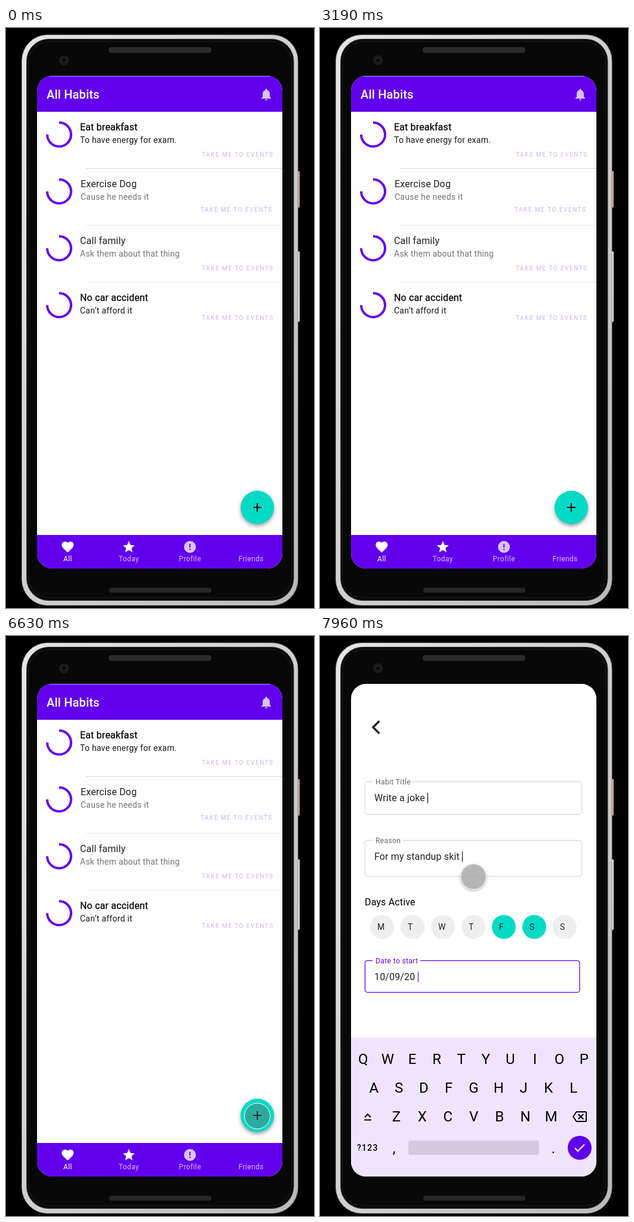
These frames come from a looping animation (516 by 969 pixels, 8000 ms). An HTML page:

```html
<!DOCTYPE html>
<html lang="en">
<head>
<meta charset="utf-8">
<title>Habit tracker</title>
<style>
  html, body { margin: 0; width: 100%; height: 100%; overflow: hidden; background: #000; }
  svg { display: block; width: 516px; height: 969px; font-family: Roboto, sans-serif; }
  .h6 { font-size: 20px; font-weight: 500; letter-spacing: .15px; }
  .title { font-size: 16px; letter-spacing: .15px; }
  .body { font-size: 14px; letter-spacing: .25px; }
  .caption { font-size: 12px; letter-spacing: .4px; }
  .overline { font-size: 10px; letter-spacing: 1.5px; fill: #cdb5f8; }
  .key { font-size: 24px; text-anchor: middle; }
  .mid { text-anchor: middle; }
  .strong { stroke: #000; stroke-width: .25px; }
  .pointer { fill: rgba(178,178,178,.765); stroke: #fff; filter: drop-shadow(0 2px 2px rgba(0,0,0,.3)); }
  .pointer.pressed { fill: rgba(104,104,104,.42); filter: none; }
</style>
</head>
<body>
<svg viewBox="0 0 516 969">
  <defs>
    <linearGradient id="metal" x1="0" y1="0" x2="1" y2="1">
      <stop offset="0" stop-color="#e6e6e4"/>
      <stop offset=".5" stop-color="#d2d1d0"/>
      <stop offset="1" stop-color="#bcbbbb"/>
    </linearGradient>
    <clipPath id="screen"><rect x="52" y="80" width="411" height="823" rx="25"/></clipPath>
  </defs>

  <g id="phone">
    <rect x="487" y="239" width="5" height="61" rx="2" fill="#d0a592"/>
    <rect x="487" y="373" width="5" height="118" rx="2" fill="#dedddd"/>
    <rect x="26.5" y="11.5" width="462.5" height="953" rx="43" fill="url(#metal)" stroke="#8f8f8f"/>
    <rect x="34.5" y="18.5" width="447.5" height="938" rx="37" fill="#0a0a0a" stroke="#3c3c3c"/>
    <rect x="37.5" y="22.5" width="441" height="929" rx="35" fill="#080808" stroke="#1b1b1b"/>
    <rect x="172" y="32" width="172" height="9.5" rx="4.5" fill="#2d2a2a"/>
    <rect x="173" y="935" width="171" height="8.5" rx="4" fill="#272525"/>
    <circle cx="97" cy="54" r="8.5" fill="#191919"/>
    <circle cx="97" cy="54" r="4" fill="#0b0b0b" stroke="#2b2b2b"/>
  </g>

  <g clip-path="url(#screen)">
    <g id="list">
      <rect x="52" y="80" width="411" height="823" fill="#fefefe"/>
      <path d="M52 80h411v60H52z" fill="#6200ee"/>
      <path d="M70 80.5h375" stroke="#cfc6dc" stroke-width=".8"/>
      <text x="68" y="118" class="h6" fill="#fff">All Habits</text>
      <path transform="translate(424 99)" fill="#d8c2fb" d="M12 22c1.1 0 2-.9 2-2h-4c0 1.1.89 2 2 2zm6-6v-5c0-3.07-1.64-5.64-4.5-6.32V4c0-.83-.67-1.5-1.5-1.5s-1.5.67-1.5 1.5v.68C7.63 5.36 6 7.92 6 11v5l-2 2v1h16v-1l-2-2z"/>
      <g id="habits"></g>
      <g style="filter: drop-shadow(0 3px 3px rgba(0,0,0,.38))">
        <circle cx="421" cy="801" r="28" fill="#03dac5"/>
      </g>
      <path d="M414 801h14M421 794v14" stroke="#000" stroke-width="2"/>
      <path d="M52 847h411v56H52z" fill="#6200ee"/>
      <g id="tabs"></g>
    </g>

    <g id="form">
      <rect x="52" y="80" width="411" height="823" fill="#fff"/>
      <path d="M99.5 142L89 152.5l10.5 10.5" fill="none" stroke="#262626" stroke-width="3.6"/>
      <g id="fields"></g>
      <text x="75" y="450" class="title">Days Active</text>
      <g id="days"></g>
      <path d="M52 671h411v232H52z" fill="#eee5fd"/>
      <g id="keys"></g>
      <path d="M75 804l5-5 5 5M74 808.5h12" fill="none" stroke="#000" stroke-width="2"/>
      <path transform="translate(423 791)" d="M22 3H7c-.69 0-1.23.35-1.59.88L0 12l5.41 8.11c.36.53.9.89 1.59.89h15c1.1 0 2-.9 2-2V5c0-1.1-.9-2-2-2zm0 16H7.07L2.4 12l4.66-7H22v14zm-11.59-2L14 13.41 17.59 17 19 15.59 15.41 12 19 8.41 17.59 7 14 10.59 10.41 7 9 8.41 12.59 12 9 15.59z"/>
      <text x="62" y="860" font-size="14" font-weight="500" letter-spacing="1.25">?123</text>
      <text x="124" y="864" class="key">,</text>
      <text x="391" y="864" class="key">.</text>
      <rect x="148" y="843" width="219" height="24" rx="4" fill="#d2c9df"/>
      <circle cx="435" cy="855" r="20" fill="#6200ee"/>
      <path d="M427 855.5l5 5 11-11" fill="none" stroke="#fff" stroke-width="2"/>
    </g>
  </g>

  <circle id="pointer" class="pointer" r="21.5"/>
</svg>

<script>
const $ = id => document.getElementById(id);
const text = (x, y, cls, fill, str) =>
  `<text x="${x}" y="${y}" class="${cls}" fill="${fill}">${str}</text>`;

// title, reason, text x, link x, link baseline, emphasised
const habits = [
  ["Eat breakfast", "To have energy for exam.", 124, 328, 215, true],
  ["Exercise Dog", "Cause he needs it", 125, 326, 307, false],
  ["Call family", "Ask them about that thing", 124, 328, 405, false],
  ["No car accident", "Can’t afford it", 124, 328, 488, true]
];
$("habits").innerHTML = habits.map(([title, reason, x, linkX, linkY, strong], i) => {
  const y = 95 * i;
  const line = i < 3
    ? `<path d="M134 ${y + 234.5}h329" stroke="${i ? "#e9e9e9" : "#d4d4d4"}"/>` : "";
  return `<path d="M89 ${y + 158}a20 20 0 1 1 -20 20" fill="none" stroke="#6200ee" stroke-width="4"/>`
    + text(x, y + 171, strong ? "title strong" : "title", strong ? "#000" : "#222", title)
    + text(x, y + 192, "body", strong ? "#1a1a1a" : "#757575", reason)
    + text(linkX, linkY, "overline", "", "TAKE ME TO EVENTS") + line;
}).join("");

const tabs = [
  ["All", "#fff", "#fff", "M12 21.35l-1.45-1.32C5.4 15.36 2 12.28 2 8.5 2 5.42 4.42 3 7.5 3c1.74 0 3.41.81 4.5 2.09C13.09 3.81 14.76 3 16.5 3 19.58 3 22 5.42 22 8.5c0 3.78-3.4 6.86-8.55 11.54z"],
  ["Today", "#d3baf9", "#fff", "M12 17.27L18.18 21l-1.64-7.03L22 9.24l-7.19-.61L12 2 9.19 8.63 2 9.24l5.46 4.73L5.82 21z"],
  ["Profile", "#d3baf9", "#d8c2fb", "M12 2a10 10 0 1 0 0 20 10 10 0 1 0 0-20zm1 15h-2v-2h2zm0-4h-2V7h2z"],
  ["Friends", "#d3baf9", "none", ""]
];
$("tabs").innerHTML = tabs.map(([label, color, iconColor, icon], i) => {
  const x = 103.4 + 102.4 * i;
  return `<path transform="translate(${x - 12} 855)" fill="${iconColor}" fill-rule="evenodd" d="${icon}"/>`
    + text(x, 891, "caption mid", color, label);
}).join("");

// label, value, top, bottom, right, label gap start and end, caret x, outline, label colour, caret colour
const fields = [
  ["Habit Title", "Write a joke", 243.5, 298, 438.5, 89, 155, 180.5, "#dcdcdc", "#666", "#000"],
  ["Reason", "For my standup skit", 341.5, 401.5, 438.5, 89, 138, 238.5, "#dcdcdc", "#666", "#000"],
  ["Date to start", "10/09/20", 542.3, 595.3, 435, 88, 168, 164.5, "#6200ee", "#6200ee", "#6200ee"]
];
$("fields").innerHTML = fields.map(
  ([label, value, top, bottom, right, gapA, gapB, caret, outline, labelColor, caretColor]) =>
    `<path d="M${gapA} ${top}H79.5a4 4 0 0 0 -4 4V${bottom - 4}a4 4 0 0 0 4 4H${right - 4}
      a4 4 0 0 0 4 -4V${top + 4}a4 4 0 0 0 -4 -4H${gapB}" fill="none" stroke="${outline}" stroke-width="1.3"/>`
    + text(93, top + 4.5, "caption", labelColor, label)
    + text(91, top + 32.5, "title", "#222", value)
    + `<path d="M${caret} ${top + 18.5}v17.5" stroke="${caretColor}" stroke-width="1.1"/>`
).join("");

$("days").innerHTML = [..."MTWTFSS"].map((day, i) =>
  `<circle cx="${104 + 51 * i}" cy="486" r="20" fill="${i === 4 || i === 5 ? "#03dac5" : "#eee"}"/>`
  + text(96 + 51 * i, 491, "body", "#222", day)
).join("");

const keyRow = (letters, x, pitch, y) =>
  [...letters].map((c, i) => text(x + pitch * i, y, "key", "#000", c)).join("");
$("keys").innerHTML = keyRow("QWERTYUIOP", 72.3, 41.1, 715)
  + keyRow("ASDFGHJKL", 90.3, 41.8, 763)
  + keyRow("ZXCVBNM", 128, 43.2, 811);

// Pointer moves: start, duration, steps, path (none = hidden). The end is held until the next move.
const moves = [
  [0],
  [120, 1, 1, "M497 953"],
  [380, 1, 1, "M505 949"],
  [440],
  [1650, 1, 1, "M513 796"],
  [2110, 140, 2, "M514 792L520 792"],
  [2250],
  [2570, 620, 9, "M506 722C400 726 300 724 209 713C130 700 130 640 200 600S400 565 520 565"],
  [3190],
  [5090, 740, 11, "M480 757C430 770 323 785 323 820C323 850 390 845 431 790"],
  [5900, 1, 1, "M432 790"],
  [5970, 140, 2, "M432 790L421 802"],
  [7547.5, 412.5, 5, "M421 802L257 402"]
].map(([start, duration, steps, d]) => {
  const path = d && document.createElementNS("http://www.w3.org/2000/svg", "path");
  if (d) path.setAttribute("d", d + (d.includes("L") || d.includes("C") ? "" : "l0 0"));
  return { start, duration, steps, path };
});

function drawPointer(t) {
  const { start, duration, steps, path } = moves.findLast(m => m.start <= t);
  const pointer = $("pointer");
  pointer.style.display = path ? "" : "none";
  if (!path) return;
  const step = Math.floor((t - start) / duration * steps + 1e-6);
  const { x, y } = path.getPointAtLength(path.getTotalLength() * Math.min(1, step / steps));
  pointer.setAttribute("cx", x);
  pointer.setAttribute("cy", y);
  pointer.classList.toggle("pressed", t >= 6560 && t < 6895);
}

function drawFade(t) {
  const held = 6560 + Math.floor((t - 6560) / 67) * 67;
  const p = Math.min(1, Math.max(0, (held - 6650) / 300));
  $("form").style.opacity = 1 - (1 - p) ** 1.65;
}

function frame() {
  const t = performance.now() % 8000;
  drawFade(t);
  drawPointer(t);
  requestAnimationFrame(frame);
}
frame();
</script>
</body>
</html>
```
